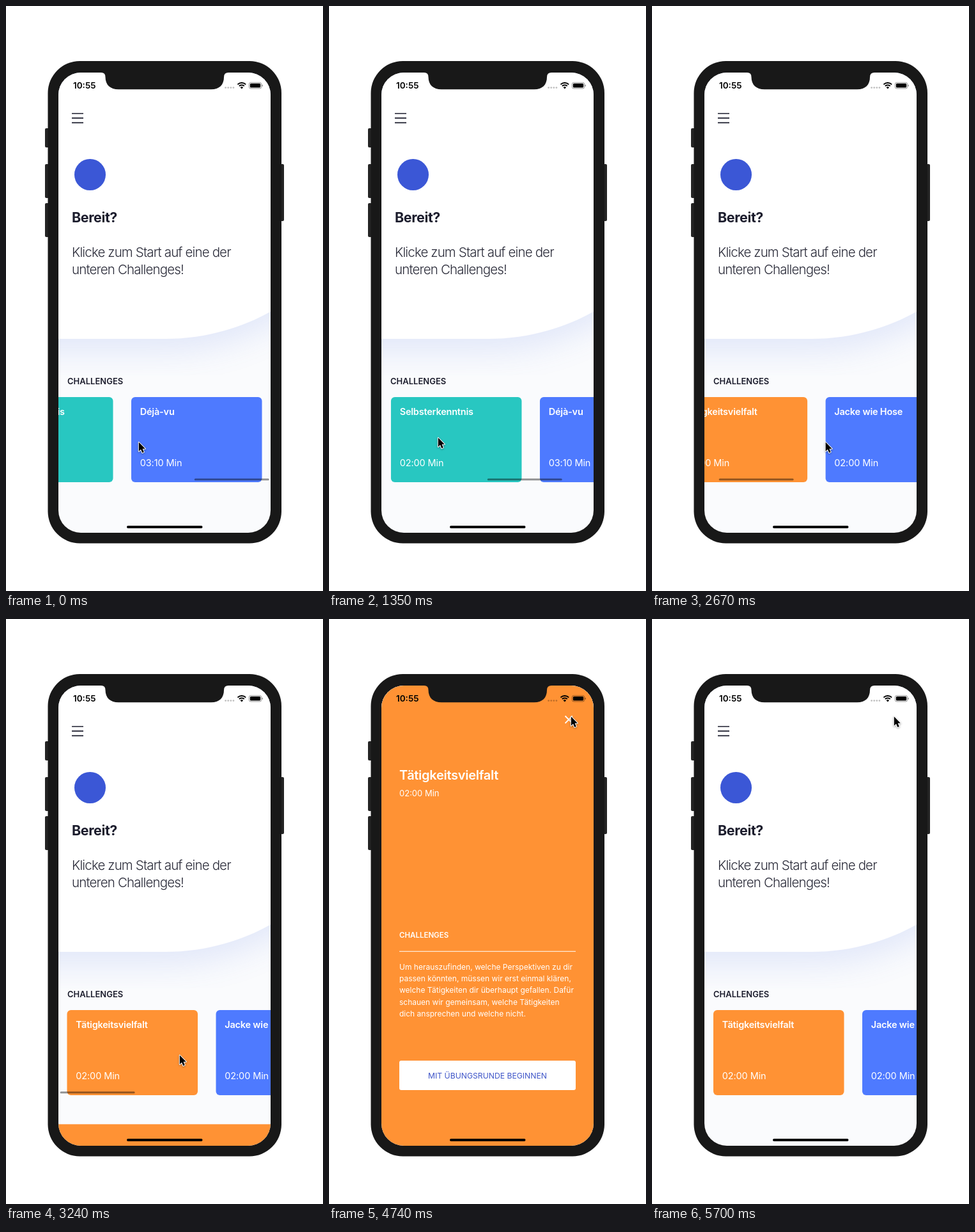
An HTML page with a canvas for the animation above (5730 ms loop, 496 px wide and 914 px high).

```html
<!DOCTYPE html>
<html lang="de">
<head>
<meta charset="utf-8">
<title>Challenges</title>
<style>
html, body { margin: 0; width: 100%; height: 100%; overflow: hidden; background: #fff; }
canvas { display: block; width: 496px; height: 914px; }
</style>
</head>
<body>
<canvas id="stage"></canvas>
<script>
const W = 496, H = 914, LOOP = 5730;
const SCREEN = { x: 82, y: 104, w: 332, h: 719 };
const INK = '#1b1c2c', ORANGE = '#ff9234', BLUE = '#4e7aff', TEAL = '#28c7c1';
const canvas = document.getElementById('stage');
const ctx = canvas.getContext('2d');
const dpr = window.devicePixelRatio || 1;
canvas.width = W * dpr;
canvas.height = H * dpr;

const cards = [
  { title: 'Tätigkeitsvielfalt', time: '02:00 Min', color: ORANGE },
  { title: 'Jacke wie Hose', time: '02:00 Min', color: BLUE },
  { title: 'Selbsterkenntnis', time: '02:00 Min', color: TEAL },
  { title: 'Déjà-vu', time: '03:10 Min', color: BLUE }
];
const PITCH = 233, CARD_W = 204.5;

const story = [
  'Um herauszufinden, welche Perspektiven zu dir',
  'passen könnten, müssen wir erst einmal klären,',
  'welche Tätigkeiten dir überhaupt gefallen. Dafür',
  'schauen wir gemeinsam, welche Tätigkeiten',
  'dich ansprechen und welche nicht.'
];

// Cursor keys: time, x, y
const cursorPath = [
  [0, 207, 681], [280, 207, 681], [600, 286, 677], [820, 286, 677],
  [1320, 170, 674], [1420, 170, 674], [1700, 258, 672], [1980, 258, 672],
  [2260, 236, 673], [2320, 236, 673], [2400, 222, 676], [2680, 271, 681],
  [3390, 271, 681], [4240, 378, 152], [LOOP, 378, 152]
];

// Critically damped spring from 0 to 1, time in ms
function spring(t, rate) {
  if (t <= 0) return 0;
  const k = t * rate / 1000;
  return 1 - (1 + k) * Math.exp(-k);
}

const clamp = v => Math.max(0, Math.min(1, v));
const smooth = u => u * u * (3 - 2 * u);

function scrollAt(t) {
  return 599 - 134 * spring(t - 300, 10)
             - 232.5 * spring(t - 1440, 10)
             - 232.5 * spring(t - 2400, 10);
}

function sheetAt(t) {
  const open = t < 5090 ? spring(t - 3222, 18) : 1 - spring(t - 5090, 18);
  return (1 - open) * 720;
}

function cursorAt(t) {
  const i = cursorPath.findIndex(k => k[0] > t);
  const [t0, x0, y0] = cursorPath[i - 1], [t1, x1, y1] = cursorPath[i];
  const u = smooth((t - t0) / (t1 - t0));
  return [x0 + (x1 - x0) * u, y0 + (y1 - y0) * u];
}

function text(str, x, y, size, weight, color, spacing = 0, align = 'left') {
  ctx.font = `${weight} ${size}px Inter, "Open Sans", sans-serif`;
  ctx.letterSpacing = spacing + 'px';
  ctx.textAlign = align;
  ctx.fillStyle = color;
  ctx.fillText(str, x, y);
}

function box(x, y, w, h, r, color) {
  ctx.fillStyle = color;
  ctx.beginPath();
  ctx.roundRect(x, y, w, h, r);
  ctx.fill();
}

function line(x0, y0, x1, y1, width, color) {
  ctx.strokeStyle = color;
  ctx.lineWidth = width;
  ctx.beginPath();
  ctx.moveTo(x0, y0);
  ctx.lineTo(x1, y1);
  ctx.stroke();
}

function drawBody() {
  for (const [y, h] of [[191, 30], [247, 53], [308, 53]]) box(61, y, 8, h, 2, '#242424');
  box(427, 247, 8, 89, 2, '#242424');
  box(65.5, 86, 365.5, 753.5, 50, '#181818');
}

function drawBackdrop() {
  ctx.fillStyle = '#fafbfd';
  ctx.fillRect(SCREEN.x, SCREEN.y, SCREEN.w, SCREEN.h);
  ctx.save();
  ctx.beginPath();
  ctx.rect(SCREEN.x, SCREEN.y, SCREEN.w, 473);
  ctx.clip();
  ctx.shadowColor = 'rgba(90,120,230,0.15)';
  ctx.shadowBlur = 50 * dpr;
  ctx.shadowOffsetY = 20 * dpr;
  ctx.fillStyle = '#fff';
  ctx.beginPath();
  ctx.moveTo(-40, 0);
  ctx.lineTo(-40, 520);
  ctx.lineTo(250, 520);
  ctx.bezierCurveTo(315, 520, 372, 501, 414, 477.5);
  ctx.lineTo(520, 410);
  ctx.lineTo(520, 0);
  ctx.fill();
  ctx.restore();
}

function drawHome(t) {
  drawBackdrop();
  for (const y of [168, 175.2, 182.4]) line(103, y, 121, y, 1.7, INK);
  ctx.fillStyle = '#3b57d6';
  ctx.beginPath();
  ctx.arc(131.5, 263.5, 24.5, 0, Math.PI * 2);
  ctx.fill();

  text('Bereit?', 103, 337.5, 21.5, 700, INK, -0.4);
  text('Klicke zum Start auf eine der', 103, 392.3, 20.5, 300, '#2a2b39', -0.85);
  text('unteren Challenges!', 103, 419.3, 20.5, 300, '#2a2b39', -0.85);
  text('CHALLENGES', 96, 591, 13, 600, INK);

  const scroll = scrollAt(t);
  cards.forEach((card, i) => {
    const x = 96 + i * PITCH - scroll;
    box(x, 611, CARD_W, 133, 6, card.color);
    text(card.title, x + 13.7, 638.8, 14.5, 600, '#fff', -0.2);
    text(card.time, x + 13.7, 718.5, 14.5, 400, '#fff', -0.1);
  });

  const alpha = 0.42 * (1 - clamp((t - 3300) / 300));
  if (alpha > 0) box(84.5 + scroll * 0.351, 738.3, 117, 3, 1.5, `rgba(0,0,0,${alpha})`);
}

function drawSheet(offset) {
  if (offset > 719.5) return;
  ctx.save();
  ctx.translate(0, offset);
  ctx.fillStyle = ORANGE;
  ctx.fillRect(SCREEN.x, SCREEN.y - 1, SCREEN.w, SCREEN.h + 2);
  line(369.5, 151.5, 380.8, 162.8, 1.8, '#fff');
  line(380.8, 151.5, 369.5, 162.8, 1.8, '#fff');
  text('Tätigkeitsvielfalt', 110, 250.8, 20, 600, '#fff', -0.28);
  text('02:00 Min', 110, 277, 13, 400, '#fff');
  text('CHALLENGES', 110, 498.3, 11.5, 600, '#fff');
  line(110, 519.3, 386, 519.3, 1.2, 'rgba(255,255,255,0.8)');
  story.forEach((row, i) => text(row, 110, 547.5 + i * 18.35, 12, 400, '#fff'));
  box(110, 690, 276, 46, 3, '#fff');
  text('MIT ÜBUNGSRUNDE BEGINNEN', 248, 717.5, 12.2, 400, '#3e55c8', 0, 'center');
  ctx.restore();
}

function drawStatus() {
  text('10:55', 105, 129.4, 13.5, 600, '#000');
  ctx.fillStyle = 'rgba(0,0,0,0.25)';
  for (let i = 0; i < 4; i++) {
    ctx.beginPath();
    ctx.arc(343.6 + i * 4.1, 127.6, 1.4, 0, Math.PI * 2);
    ctx.fill();
  }
  ctx.strokeStyle = ctx.fillStyle = '#000';
  ctx.lineWidth = 2;
  for (const r of [9, 5.6]) {
    ctx.beginPath();
    ctx.arc(368.8, 129, r, -Math.PI * 0.75, -Math.PI * 0.25);
    ctx.stroke();
  }
  ctx.beginPath();
  ctx.moveTo(368.8, 129.4);
  ctx.arc(368.8, 129.4, 3.2, -Math.PI * 0.75, -Math.PI * 0.25);
  ctx.fill();

  ctx.strokeStyle = 'rgba(0,0,0,0.4)';
  ctx.lineWidth = 1;
  ctx.beginPath();
  ctx.roundRect(380.3, 119.6, 19.4, 9.4, 2.6);
  ctx.stroke();
  box(381.8, 121.1, 16.4, 6.4, 1.5, '#000');
  box(400.5, 122.8, 1.4, 3.2, [0, 1.4, 1.4, 0], 'rgba(0,0,0,0.45)');
  box(189, 812, 118.5, 4, 2, '#000');
}

function drawNotch() {
  ctx.fillStyle = '#181818';
  ctx.beginPath();
  ctx.moveTo(149, 102);
  ctx.lineTo(149, 104);
  ctx.quadraticCurveTo(155.5, 104, 155.5, 111);
  ctx.bezierCurveTo(155.5, 123, 163, 130.3, 176, 130.3);
  ctx.lineTo(321, 130.3);
  ctx.bezierCurveTo(334, 130.3, 341, 123, 341, 111);
  ctx.quadraticCurveTo(341, 104, 348, 104);
  ctx.lineTo(348, 102);
  ctx.fill();
}

function drawCursor(x, y) {
  const shape = [[0, 0], [0, 14.2], [3.2, 11.2], [5.5, 16.4], [8, 15.3], [5.8, 10.2], [10, 10.2]];
  ctx.save();
  ctx.translate(x + 0.8, y + 0.6);
  ctx.beginPath();
  shape.forEach(([px, py]) => ctx.lineTo(px, py));
  ctx.closePath();
  ctx.lineJoin = 'round';
  ctx.lineWidth = 2;
  ctx.strokeStyle = '#fff';
  ctx.shadowColor = 'rgba(0,0,0,0.35)';
  ctx.shadowBlur = 3 * dpr;
  ctx.shadowOffsetY = dpr;
  ctx.stroke();
  ctx.shadowColor = 'transparent';
  ctx.fillStyle = '#000';
  ctx.fill();
  ctx.restore();
}

function draw() {
  const t = performance.now() % LOOP;
  ctx.setTransform(dpr, 0, 0, dpr, 0, 0);
  ctx.fillStyle = '#fff';
  ctx.fillRect(0, 0, W, H);
  drawBody();

  ctx.save();
  ctx.beginPath();
  ctx.roundRect(SCREEN.x, SCREEN.y, SCREEN.w, SCREEN.h, 35);
  ctx.clip();
  drawHome(t);
  drawSheet(sheetAt(t));
  drawStatus();
  drawNotch();
  ctx.restore();

  drawCursor(...cursorAt(t));
  requestAnimationFrame(draw);
}
draw();
</script>
</body>
</html>
```
